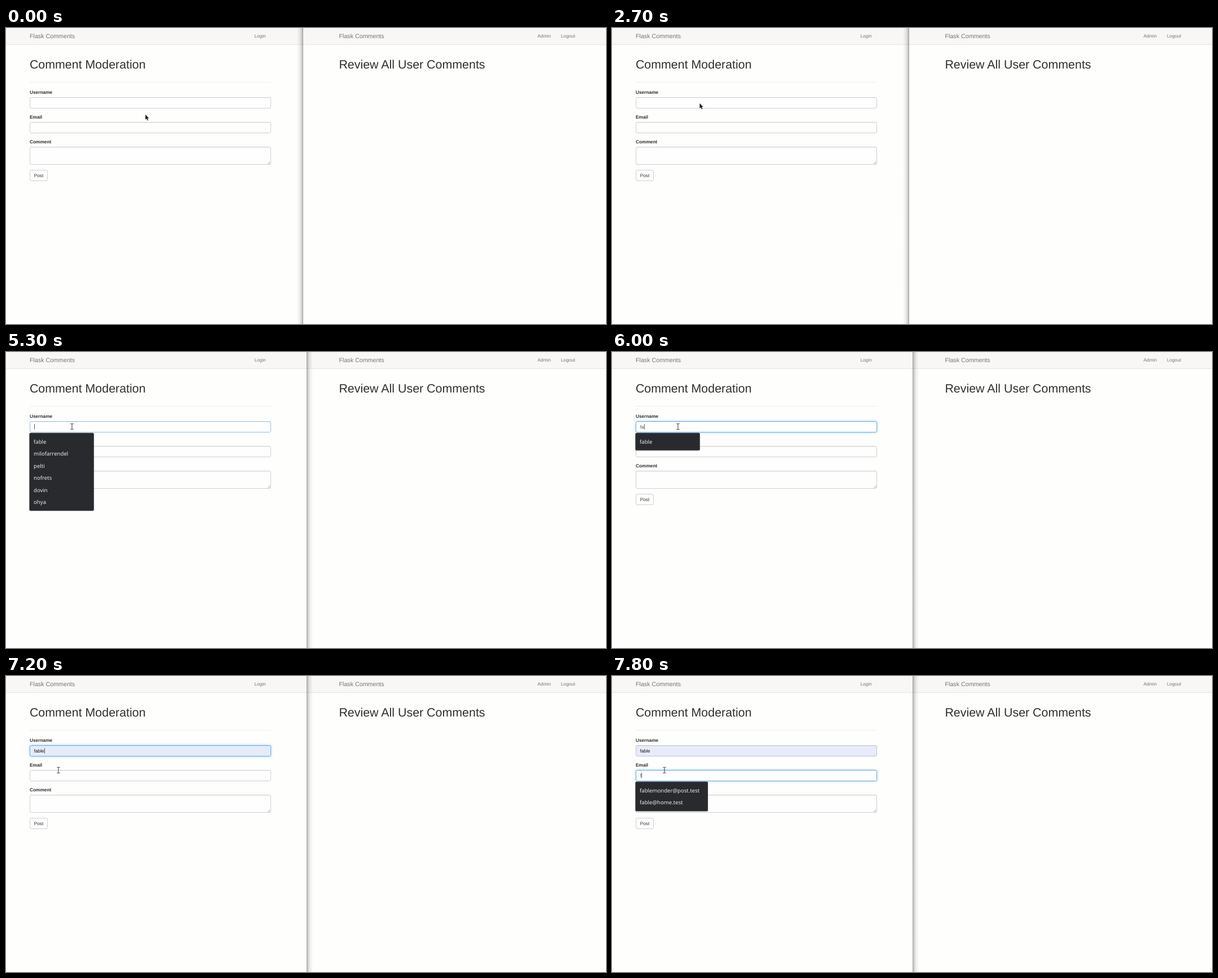
An HTML page for the animation above (8 s loop, 1064 by 526 pixels).

```html
<!DOCTYPE html>
<html lang="en">
<head>
<meta charset="utf-8">
<title>Comment moderation demo</title>
<style>
  html, body { margin: 0; width: 100%; height: 100%; overflow: hidden; background: #fefefd; }
  svg { display: block; width: 1064px; height: 526px; }
  text {
    font: 8.3px "Liberation Sans", Arial, sans-serif;
    fill: #333;
    text-rendering: geometricPrecision;
    white-space: pre;
  }
  .nav { fill: #777573; }
  .brand { font-size: 10.7px; fill: #777573; }
  .title { font-size: 21.4px; fill: #2f2f2f; }
  .label { font-weight: bold; fill: #2f2f2f; }
  .box { fill: #fefefe; stroke: #cfcfcf; }
  .item { font: 9.6px "Noto Sans", "Open Sans", sans-serif; fill: #e8eaed; }
</style>
</head>
<body>
<svg viewBox="0 0 1064 526">
  <defs>
    <linearGradient id="fade">
      <stop offset="0" stop-color="#000" stop-opacity=".4"/>
      <stop offset=".15" stop-color="#000" stop-opacity=".22"/>
      <stop offset=".5" stop-color="#000" stop-opacity=".08"/>
      <stop offset="1" stop-color="#000" stop-opacity="0"/>
    </linearGradient>
  </defs>

  <rect width="1064" height="526" fill="#fefefd"/>
  <rect width="1064" height="29" fill="#f8f7f6"/>
  <rect y="29" width="1064" height="1" fill="#e5e5e4"/>
  <rect id="edge" width="11" height="526" fill="url(#fade)"/>

  <text class="brand" x="42" y="18">Flask Comments</text>
  <text class="nav" x="440.4" y="17.2">Login</text>
  <text class="title" x="41.9" y="71.9">Comment Moderation</text>
  <rect x="42" y="96" width="428" height="1" fill="#eeeeed"/>

  <text class="brand" x="590.5" y="18">Flask Comments</text>
  <text class="nav" x="942.5" y="17.2">Admin</text>
  <text class="nav" x="984" y="17.2">Logout</text>
  <text class="title" x="590.4" y="71.9">Review All User Comments</text>

  <g id="form"></g>
  <rect class="box" x="42.5" y="252.5" width="31" height="19" rx="2.4"/>
  <text x="49.7" y="265">Post</text>
  <path d="M464.5 241.5l4-4M467 241.5l1.5-1.5" stroke="#777" stroke-width=".7"/>

  <g id="popup"></g>
  <path id="arrow" d="M0 0V9.2L2.1 7.3L3.6 10.6L5 10L3.5 6.8H6.2Z"
        fill="#1c1c1c" stroke="#fff" stroke-width=".7" paint-order="stroke"/>
  <path id="beam" d="M-2.6 -5H-.6L0 -4.5L.6 -5H2.6M0 -4.5V4.5M-2.6 5H-.6L0 4.5L.6 5H2.6"
        fill="none" stroke="#333"/>
</svg>

<script>
const LOOP = 8000, STEP = 100;
const CLICK_USER = 5200, PREVIEW = 6300, PICK = 6800, CLICK_EMAIL = 7500;
const ROW = 21.45;

const users = ['fable', 'milofarrendel', 'pelti', 'nofrets', 'dovin', 'ohya', 'fenlow'];
const emails = ['fablemonder@post.test', 'fable@home.test',
  ...users.slice(1, 5).map(name => name + '@post.test')];

// Each glide bends from the previous rest point towards `to`.
const glides = [
  { start: 0, steps: 1, to: [247.3, 153.8] },
  { start: 1000, steps: 7, bend: [132, 118], to: [164, 146] },
  { start: 2100, steps: 1, to: [267, 155.5] },
  { start: 2700, steps: 1, to: [155.5, 133.8] },
  { start: 2900, steps: 4, to: [41, 80.5] },
  { start: 3500, steps: 6, to: [196, 72] },
  { start: 4200, steps: 7, bend: [130, 103], to: [117, 132.5] },
  { start: 6200, steps: 3, to: [95, 159] },
  { start: 6800, steps: 5, to: [93, 167.3] }
];

const $ = id => document.getElementById(id);
const clamp = v => Math.min(1, Math.max(0, v));
const easeOut = u => 1 - (1 - u) ** 2;
const mix = (a, b, k) => a.map((v, i) => v + (b[i] - v) * k);
const rgb = color => `rgb(${color.map(Math.round)})`;
const show = (el, on) => el.setAttribute('visibility', on ? 'visible' : 'hidden');

function add(parent, tag, attrs, content = '') {
  const el = document.createElementNS('http://www.w3.org/2000/svg', tag);
  for (const key in attrs) el.setAttribute(key, attrs[key]);
  el.textContent = content;
  return parent.appendChild(el);
}

function makeField(label, top, height) {
  const form = $('form');
  add(form, 'text', { class: 'label', x: 42, y: top - 6 }, label);
  const box = add(form, 'rect', {
    class: 'box', x: 42.5, y: top + .5, width: 427, height: height - 1, rx: 2.4
  });
  add(form, 'rect', { x: 44, y: top + 1, width: 424, height: .6, opacity: .06 });
  const value = add(form, 'text', { x: 49.7, y: top + 13 });
  const caret = add(form, 'rect', {
    y: top + 5, width: .8, height: 9.6, fill: '#333', visibility: 'hidden'
  });
  return { box, value, caret };
}

const user = makeField('Username', 123, 20);
const email = makeField('Email', 167, 20);
makeField('Comment', 211, 32);

function drawField({ box, value, caret }, text, glow, focused, filled) {
  const border = filled ? [190, 197, 214] : [207, 207, 207];
  box.style.stroke = rgb(mix(border, [102, 175, 233], glow));
  box.style.fill = filled ? rgb(mix([231, 235, 250], [229, 236, 250], glow)) : '#fefefe';
  box.style.filter = glow > .5 ? 'drop-shadow(0 0 2.2px rgba(102,175,233,.6))' : 'none';
  value.textContent = text;
  value.style.fill = filled ? '#111' : '#555';
  caret.setAttribute('x', 50 + (text ? value.getComputedTextLength() : 0));
  show(caret, focused);
}

function drawPopup(names, typed, top, width, lit) {
  const items = names.filter(name => name.startsWith(typed)).slice(0, 6);
  const popup = $('popup');
  const box = { x: 41.5, y: top, width, height: 9.6 + ROW * items.length, rx: 2 };
  add(popup, 'rect', { ...box, y: top + .6, fill: 'none', stroke: '#000', 'stroke-opacity': .22 });
  add(popup, 'rect', { ...box, fill: '#292a2d' });
  if (lit) add(popup, 'rect', { ...box, y: top + 5, height: ROW, rx: 0, fill: '#3f4043' });
  items.forEach((item, i) =>
    add(popup, 'text', { class: 'item', x: 49, y: top + 19 + ROW * i }, item));
}

function pointerAt(t) {
  const i = glides.findLastIndex(glide => glide.start <= t);
  const { start, steps, to, bend } = glides[i];
  const from = i ? glides[i - 1].to : to;
  const mid = bend || mix(from, to, .5);
  const u = easeOut(clamp(((t - start) / STEP + 1) / steps));
  return mix(mix(from, mid, u), mix(mid, to, u), u);
}

function draw(t) {
  const during = (from, to) => t >= from && t < to;
  const typed = (word, from, pace) => word.slice(0, Math.max(0, Math.floor((t - from) / pace)));
  const filled = t >= PREVIEW;
  const name = filled ? users[0] : typed(users[0], CLICK_USER, 400);
  const address = typed(emails[0], CLICK_EMAIL, 300);

  const fadeIn = clamp((t - CLICK_USER) / 200);
  const fadeOut = clamp((CLICK_EMAIL + STEP - t) / 200);
  const userCaret = during(CLICK_USER + STEP, PREVIEW) || during(PICK, CLICK_EMAIL);
  drawField(user, name, Math.min(fadeIn, fadeOut), userCaret, filled);
  drawField(email, address, 1 - fadeOut, t >= CLICK_EMAIL, false);

  const userList = during(CLICK_USER + STEP, PICK);
  $('popup').replaceChildren();
  if (userList) drawPopup(users, filled ? 'fa' : name, 143.8, 114.3, filled);
  if (t > CLICK_EMAIL) drawPopup(emails, address, 187.7, 128.5, false);

  $('edge').setAttribute('transform',
    t < CLICK_USER ? 'translate(527 0) scale(-1 1)' : 'translate(533 0)');

  const [x, y] = pointerAt(t);
  const beam = t >= 4600 && !(userList && y > 145);
  for (const id of ['arrow', 'beam']) {
    $(id).setAttribute('transform', `translate(${x} ${y})`);
    show($(id), beam === (id === 'beam'));
  }
}

const begin = performance.now();
let last = -1;
function tick() {
  const step = Math.floor((performance.now() - begin) % LOOP / STEP);
  if (step !== last) draw(step * STEP);
  last = step;
  requestAnimationFrame(tick);
}
tick();
</script>
</body>
</html>
```
